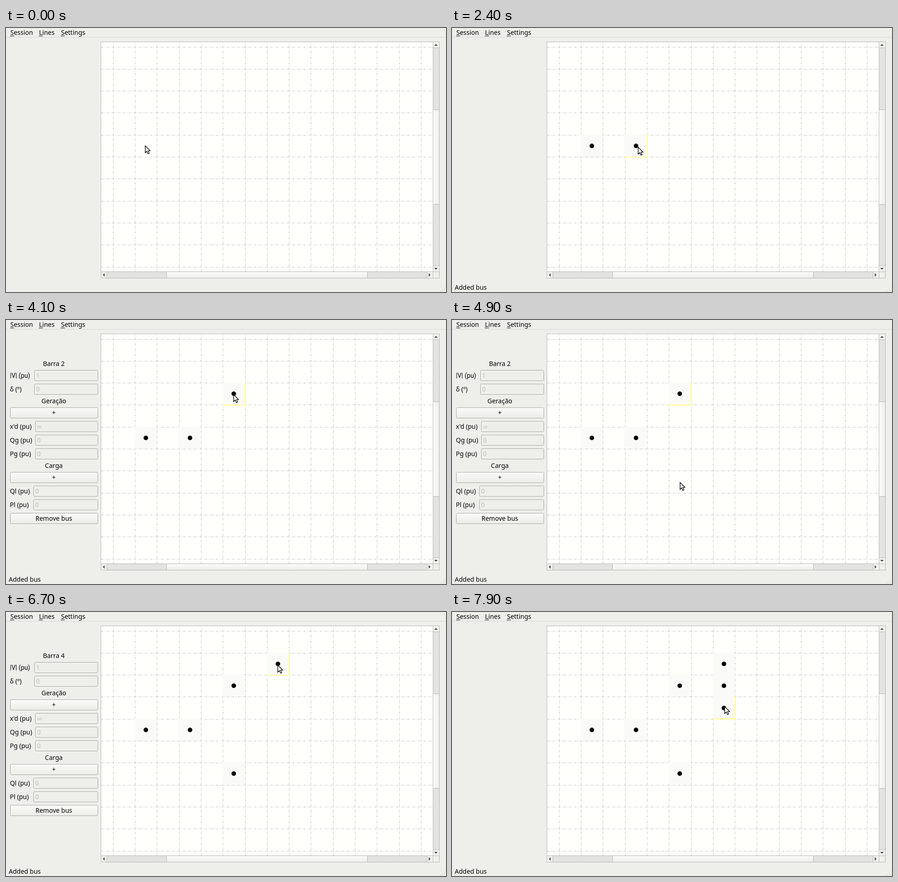
An HTML page with a canvas that plays this animation: 966 px wide and 580 px high, repeating every 8000 ms.

```html
<!DOCTYPE html>
<html>
<head>
<meta charset="utf-8">
<style>
html, body { margin: 0; width: 100%; height: 100%; overflow: hidden; background: #eeeeeb; }
canvas { display: block; }
</style>
</head>
<body>
<canvas id="stage" width="966" height="580"></canvas>
<script>
const g = document.getElementById('stage').getContext('2d');
const LOOP = 8000, STEP = 100, CELL = 48.3, LEFT = 234.7, TOP = 41.5;
const WINDOW = '#eeeeeb', PAPER = '#fffffc', BORDER = '#b6b6b2', TROUGH = '#e3e4e1', BUTTON = '#f3f3f0';

// Each click: pointer place, arrival and travel time, press time,
// and the gap from selection to bus and from bus to panel.
const clicks = [
  { name: 'Slack', x: 306, y: 260, arrive: 100, travel: 100, press: 650, gap: 50 },
  { name: '1', x: 408, y: 261, arrive: 1600, travel: 600, press: 2200, gap: 200 },
  { name: '2', x: 499, y: 163, arrive: 3400, travel: 600, press: 3750, gap: 150 },
  { name: '3', x: 500, y: 356, arrive: 4900, travel: 800, press: 5100, gap: 200 },
  { name: '4', x: 596, y: 116, arrive: 6200, travel: 700, press: 6390, gap: 150 },
  { name: '5', x: 597, y: 165, arrive: 7100, travel: 400, press: 7300, gap: 100 },
  { name: '6', x: 598, y: 207, arrive: 7700, travel: 200, press: 7800, gap: 100 }
];

const gridX = i => LEFT + CELL * i;
const gridY = i => TOP + CELL * i;

// Corner of the grid cell under a point
const cellAt = ({ x, y }) => [
  gridX(Math.floor((x - LEFT) / CELL)),
  gridY(Math.floor((y - TOP) / CELL))
];

function rect(x, y, w, h, color) {
  g.fillStyle = color;
  g.fillRect(x, y, w, h);
}

function text(str, x, y, align = 'left', color = '#000', font = 'Noto Sans') {
  g.font = `14px "${font}", sans-serif`;
  g.textAlign = align;
  g.fillStyle = color;
  g.fillText(str, x, y);
}

function poly(points, color) {
  g.beginPath();
  points.forEach(([x, y]) => g.lineTo(x, y));
  g.closePath();
  g.fillStyle = color;
  g.fill();
}

function blend(x0, y0, x1, y1, from, to) {
  const fill = g.createLinearGradient(x0, y0, x1, y1);
  fill.addColorStop(0, from);
  fill.addColorStop(1, to);
  return fill;
}

function box(x, y, w, h, fill) {
  g.beginPath();
  g.roundRect(x + .5, y + .5, w - 1, h - 1, 2);
  g.fillStyle = fill;
  g.fill();
  g.strokeStyle = '#a8a8a4';
  g.lineWidth = 1;
  g.stroke();
}

function menu(str, x) {
  text(str, x, 15);
  rect(Math.floor(x), 17, 9, 1, '#000');
}

function grid() {
  g.save();
  g.beginPath();
  g.rect(209, 31, 728, 505);
  g.clip();
  g.strokeStyle = '#b9b9b9';
  g.lineWidth = 1;
  g.setLineDash([4, 2, 1, 2, 1, 2]);
  g.beginPath();
  for (let i = 0; i < 15; i++) {
    const x = Math.round(gridX(i)) + .5, y = Math.round(gridY(i)) + .5;
    g.moveTo(x, gridY(-7));
    g.lineTo(x, 540);
    g.moveTo(gridX(-5), y);
    g.lineTo(940, y);
  }
  g.stroke();
  g.restore();
}

function arrow(x, y, turns) {
  g.save();
  g.translate(x, y);
  g.rotate(turns * Math.PI / 2);
  poly([[-4, 2], [4, 2], [0, -2]], '#4b4b49');
  g.restore();
}

function scrollbars() {
  rect(937, 31, 14, 518, TROUGH);
  rect(209, 536, 728, 13, TROUGH);
  rect(938, 179, 13, 208, blend(938, 0, 951, 0, '#fbfbf9', WINDOW));
  rect(352, 536, 441, 13, blend(0, 536, 0, 549, '#fbfbf9', WINDOW));
  for (const y of [31, 523]) rect(938, y, 13, 13, BUTTON);
  for (const x of [209, 924]) rect(x, 536, 13, 13, BUTTON);
  rect(938, 536, 13, 13, WINDOW);
  for (const x of [221, 352, 793, 924]) rect(x, 536, 1, 13, BORDER);
  for (const y of [43, 179, 387, 522]) rect(938, y, 13, 1, BORDER);
  rect(937, 31, 1, 518, BORDER);
  rect(209, 535, 742, 1, BORDER);
  arrow(944, 37, 0);
  arrow(930, 542.5, 1);
  arrow(944, 529, 2);
  arrow(214.5, 542.5, 3);
  g.strokeStyle = BORDER;
  g.lineWidth = 1;
  g.strokeRect(208.5, 30.5, 743, 519);
}

function sizeGrip() {
  for (let i = 0; i < 4; i++)
    for (let j = 0; j <= i; j++)
      rect(963 - 3 * j, 569 + 3 * i, 1, 1, '#bdbdb9');
}

function field(label, value, left, y, font) {
  text(label, 8.5, y + 5, 'left', '#000', font);
  box(left, y - 12, 202 - left, 24, WINDOW);
  text(value, left + 4, y + 5, 'left', '#bebebc');
}

function button(label, y) {
  box(9, y - 12, 193, 24, blend(0, y - 12, 0, y + 12, '#fbfbf9', '#ebebe7'));
  text(label, 105, y + 5, 'center');
}

function panel(name) {
  text('Barra ' + name, 105, 101, 'center');
  field('|V| (pu)', '1', 62, 122, 'Roboto');
  field('δ (º)', '0', 62, 152);
  text('Geração', 105, 183, 'center');
  button('+', 204);
  field("x'd (pu)", '∞', 64, 234);
  field('Qg (pu)', '0', 64, 264);
  field('Pg (pu)', '0', 64, 294);
  text('Carga', 105, 325, 'center');
  button('+', 346);
  field('Ql (pu)', '0', 60, 376);
  field('Pl (pu)', '0', 60, 406);
  button('Remove bus', 436);
}

function tile(click) {
  const [x, y] = cellAt(click);
  rect(Math.floor(x - .7), Math.floor(y - .7), 49, 49, '#fafaf8');
  g.beginPath();
  g.arc(Math.round(x + CELL / 2), Math.round(y + CELL / 2), 5, 0, 7);
  g.fillStyle = '#000';
  g.fill();
}

function highlight(click) {
  const [x, y] = cellAt(click);
  g.strokeStyle = '#ffff80';
  g.lineWidth = 2;
  g.strokeRect(x + .9, y + .4, CELL, CELL);
}

// The pointer slows into each click, sideways motion leading.
function pointer(t) {
  let x = 305, y = 258;
  for (const c of clicks) {
    const left = 1 - Math.min(1, Math.max(0, (t - c.arrive + c.travel) / c.travel));
    x += (c.x - x) * (1 - left ** 3);
    y += (c.y - y) * (1 - left ** 1.6);
  }
  g.save();
  g.translate(Math.round(x) + .5, Math.round(y) + .5);
  g.lineWidth = 1.3;
  g.strokeStyle = '#000';
  poly([[.2, .3], [.2, 15.6], [3.8, 12.4], [6.3, 18], [8.9, 17], [6.5, 11.4], [11, 11.2]], '#fff');
  g.stroke();
  g.restore();
}

function draw(now) {
  const t = Math.floor(now % LOOP / STEP) * STEP;
  rect(0, 0, 966, 580, WINDOW);
  rect(0, 20, 966, 1, '#d6d6d2');
  menu('Session', 9.5);
  menu('Lines', 72.5);
  menu('Settings', 120.7);
  rect(209, 31, 728, 505, PAPER);
  grid();
  const current = clicks.filter(c => t >= c.press).pop();
  if (current) {
    highlight(current);
    if (t >= current.press + 2 * current.gap) panel(current.name);
    text('Added bus', 6, 575);
  }
  clicks.filter(c => t >= c.press + c.gap).forEach(tile);
  scrollbars();
  sizeGrip();
  pointer(t);
}

const start = performance.now();
function tick() {
  draw(performance.now() - start);
  requestAnimationFrame(tick);
}
tick();
</script>
</body>
</html>
```
